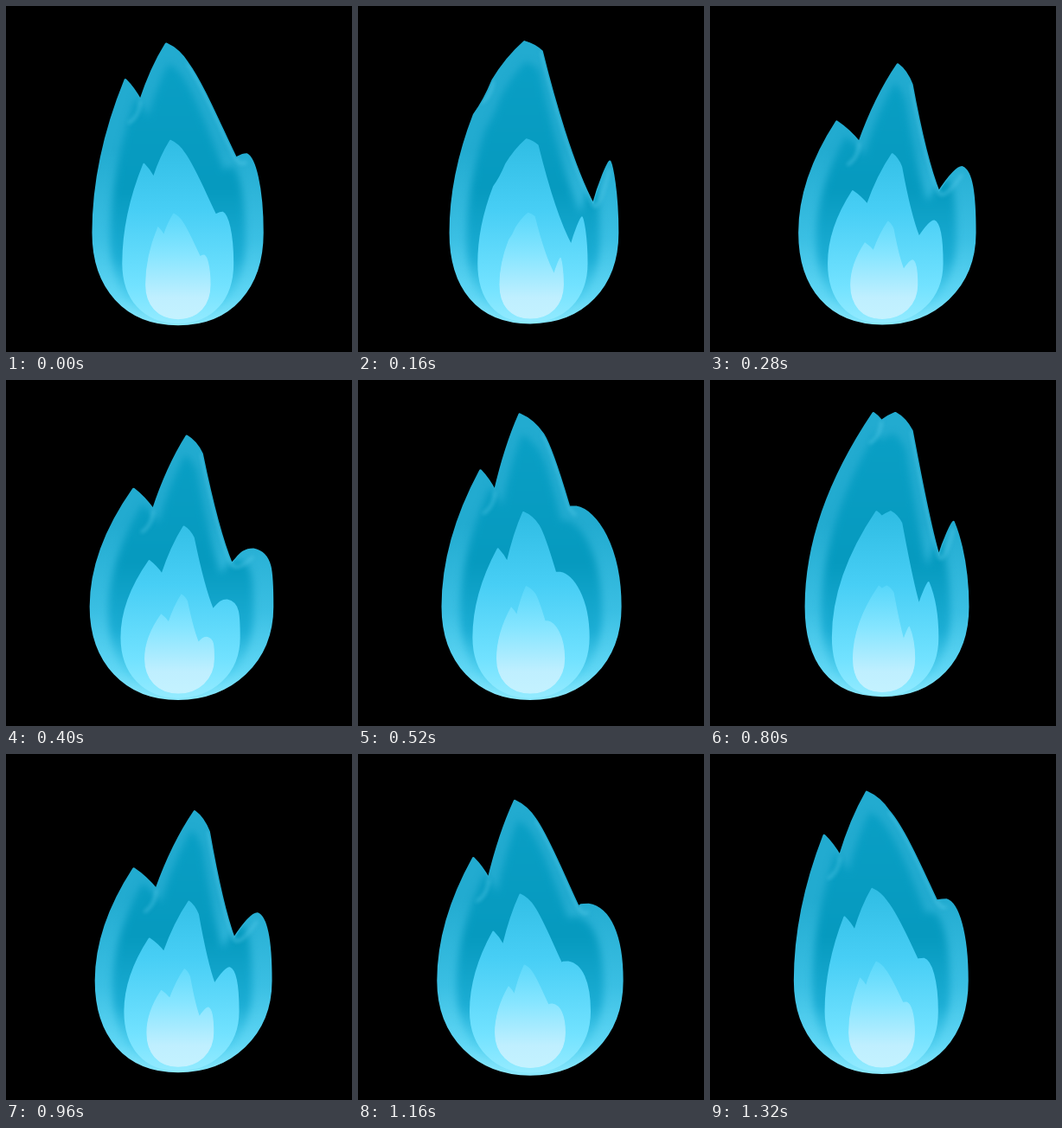
These frames come from a looping animation (400 px wide and 400 px high, 1.36 s). An HTML page with a canvas:

```html
<!DOCTYPE html>
<html lang="en">
<head>
<meta charset="utf-8">
<title>Blue flame</title>
<style>
  html, body { margin: 0; height: 100%; overflow: hidden; background: #000; }
  canvas { display: block; width: 100vw; height: 100vh; }
</style>
</head>
<body>
<canvas id="stage" width="400" height="400"></canvas>
<script>
const ctx = document.getElementById('stage').getContext('2d');
const LOOP = 1360, STEP = 40;
const LICK = LOOP / 2;   // a new tongue starts this often
const BIRTH = 160;       // time of the first start
const CX = 199, BASE = 366, WAIST = 262;

// Life of a tongue's tip, four points per lick: left lobe, main tip, right shoulder.
const tipPath = [
  [138, 120], [149, 133], [137, 111], [142, 80],
  [196, 36], [219, 74], [183, 45], [190, 36],
  [216, 47], [238, 104]
];
// Right lobe over one lick, eight points each.
const notchPath = [
  [269, 223], [265, 215], [263, 213], [262, 213],
  [249, 159], [251, 157], [260, 163], [266, 192]
];
const lobePath = [
  [288, 173], [291, 181], [290, 190], [286, 198],
  [258, 158], [262, 155], [272, 160], [281, 168]
];

const clamp = v => Math.min(1, Math.max(0, v));
const mix = (a, b, k) => a + (b - a) * k;
const wave = (age, peak) => Math.cos((age - peak) / LICK * 2 * Math.PI);

// Catmull-Rom through evenly timed points.
function along(points, u, closed) {
  const n = points.length, i = Math.floor(u), k = u - i;
  const at = j => points[closed ? (j + n) % n : Math.min(n - 1, Math.max(0, j))];
  const [a, b, c, d] = [at(i - 1), at(i), at(i + 1), at(i + 2)];
  return b.map((v, m) => v + 0.5 * k * (c[m] - a[m]
    + k * (2 * a[m] - 5 * v + 4 * c[m] - d[m]
    + k * (3 * (v - c[m]) + d[m] - a[m]))));
}

function flank(p, sx, sy, qx, qy, bend) {
  const dx = qx - sx, dy = qy - sy;
  p.bezierCurveTo(
    sx + dx * mix(0.35, 0.22, bend), sy + dy * mix(0.2, 0.3, bend),
    qx - dx * mix(0.25, 0.4, bend), qy - dy * mix(0.3, 0.25, bend), qx, qy);
}

function shape(t) {
  const age = (t - BIRTH + LOOP) % LICK;
  // Alternate licks lean to opposite sides.
  const sway = -Math.cos((t + STEP) / LOOP * 2 * Math.PI);
  const tip = lick => {
    const [x, y] = along(tipPath, (age / LICK + lick) * 4);
    return [x + 6 * sway, y + 2 - 6 * sway];
  };
  const side = path => {
    const [x, y] = along(path, age / LICK * 8, true);
    return [x - 5 * sway, y + 1 - 10 * sway];
  };

  const [lx, ly] = tip(0), [mx, my] = tip(1), [ox, oy] = tip(2);
  const [qx, qy] = side(notchPath), [rx, ry] = side(lobePath);
  const bend = clamp((qy - 165) / 50);

  const depth = clamp(2 * Math.sin(age / LICK * Math.PI));
  const nx = mix(lx, mx, 0.37), ny = ly + mix((my - ly) * 0.47, 24, depth);

  const sink = clamp(age / 200) ** 2;
  const sx = mix(ox, mx + mix(27, 17, bend), sink);
  const sy = mix(oy, my + mix(23, 20, bend), sink);

  const wl = 102 + 3 * sway + 7 * wave(age, -20);
  const wr = 302 + 6 * wave(age, 210);
  const r = 8 - 7 * wave(age, -30);
  const bottom = 368 + (100 - wl) * 0.3;
  const low = mix(WAIST, bottom, 0.6);

  const body = new Path2D();
  body.moveTo(CX, bottom);
  body.bezierCurveTo(CX - 61, bottom, wl, low, wl, WAIST);
  body.bezierCurveTo(wl, mix(WAIST, ly, 0.36),
    mix(lx, wl, 0.58), mix(ly, WAIST, 0.3), lx, ly);
  body.quadraticCurveTo(mix(lx, nx, 0.55), mix(ly, ny, 0.4), nx, ny);
  body.quadraticCurveTo(mix(nx, mx, 0.42), mix(ny, my, 0.58), mx, my);
  body.quadraticCurveTo(mix(mx, sx, 0.6), mix(my, sy, 0.3), sx, sy);
  flank(body, sx, sy, qx, qy, bend);
  body.bezierCurveTo(mix(qx, rx, 0.35), mix(qy, ry, 0.5), rx - r, ry, rx, ry);
  body.bezierCurveTo(rx + r * 1.6, ry + 4, wr, mix(ry, WAIST, 0.4), wr, WAIST);
  body.bezierCurveTo(wr, low, CX + 61, bottom, CX, bottom);
  body.closePath();

  // Soft folds running inward from the two notches.
  const folds = new Path2D();
  folds.moveTo(nx, ny);
  folds.quadraticCurveTo(nx - 1, ny + 18, nx - 14, ny + 26);
  folds.moveTo(sx, sy);
  flank(folds, sx, sy, qx, qy, bend);
  folds.quadraticCurveTo(qx + 6, qy + 10, rx, ry + 8);
  return { body, folds };
}

function gradient(stops) {
  const g = ctx.createLinearGradient(0, 30, 0, 370);
  for (const [at, color] of stops) g.addColorStop(at, color);
  return g;
}

const outer = gradient([[0, '#22abd0'], [0.4, '#22abd0'], [0.7, '#3abfe3'], [0.9, '#60d7f5'], [1, '#8ce8fd']]);
const dark = gradient([[0, '#0a9fc5'], [0.5, '#069abf'], [0.75, '#1cadd4'], [1, 'rgba(80,212,244,0)']]);
const middle = gradient([[0, '#2dbbe2'], [0.4, '#47cef5'], [0.8, '#72e2ff'], [1, '#94ebff']]);
const inner = gradient([[0, '#55d6fa'], [0.4, '#85e5ff'], [0.8, '#bfefff'], [1, '#c4f2ff']]);

function layer(path, fill, sx, sy, base, blur) {
  ctx.save();
  if (blur) ctx.filter = `blur(${blur}px)`;
  ctx.translate(CX, base);
  ctx.scale(sx, sy);
  ctx.translate(-CX, -BASE);
  ctx.fillStyle = ctx.strokeStyle = fill;
  ctx.lineWidth = 3;
  ctx.lineJoin = 'round';
  ctx.fill(path);
  if (!blur) ctx.stroke(path);
  ctx.restore();
}

function draw(t) {
  const { body, folds } = shape(t);
  ctx.clearRect(0, 0, 400, 400);
  layer(body, outer, 1, 1, BASE);

  ctx.save();
  ctx.clip(body);
  layer(body, dark, 0.8, 0.93, BASE, 4);
  ctx.filter = 'blur(2px)';
  ctx.strokeStyle = 'rgba(90,205,235,.55)';
  ctx.lineWidth = 3;
  ctx.stroke(folds);
  ctx.restore();

  layer(body, middle, 0.65, 0.65, 365);
  layer(body, inner, 0.38, 0.375, 361);
}

const start = performance.now();
function tick() {
  const t = (performance.now() - start) % LOOP;
  draw(Math.floor(t / STEP) * STEP);
  requestAnimationFrame(tick);
}
tick();
</script>
</body>
</html>
```
